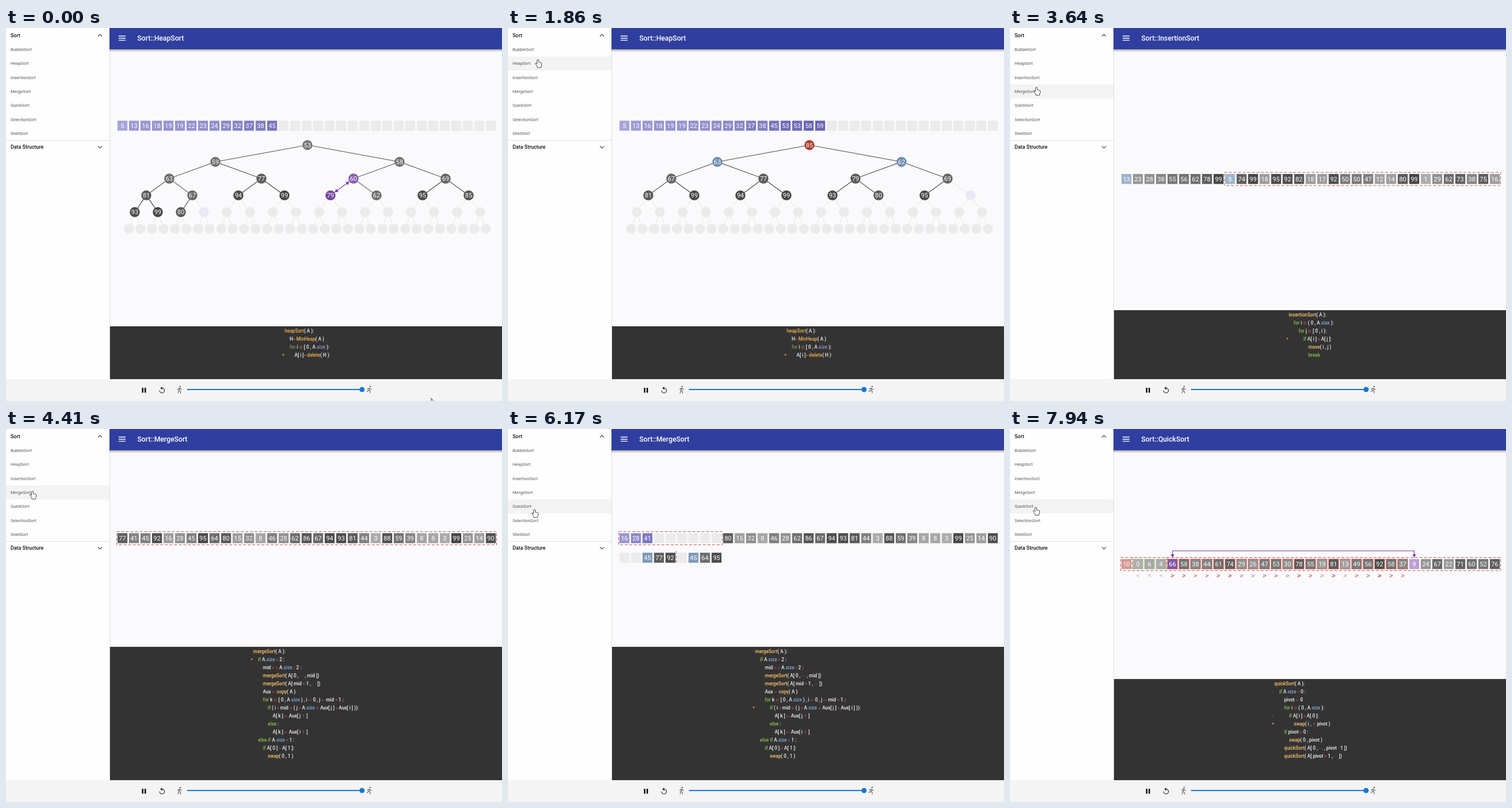
Write an HTML page that moves like this. It is 863 by 649 pixels and loops after 8 s.

```html
<!DOCTYPE html>
<html lang="en">
<head>
<meta charset="utf-8">
<title>Sorting visualizer</title>
<style>
  html, body { margin: 0; width: 100%; height: 100%; overflow: hidden; }
  svg { display: block; width: 863px; height: 649px; }
  text { font: 7.5px Roboto, "DejaVu Sans", sans-serif; fill: #555; white-space: pre; }
  .head { font-size: 8.9px; font-weight: 500; fill: #111; }
  .title { font-size: 12.2px; font-weight: 500; fill: #fff; }
  .num { font-size: 11px; fill: #fff; text-anchor: middle; }
  .rel { font-size: 9px; text-anchor: middle; }
  .code { font-size: 8.2px; font-weight: 500; fill: #f5f5f5; }
  .line { fill: none; stroke-width: 1.2; }
  .dash { fill: none; stroke: #c8564f; stroke-dasharray: 5 3; }
  .swap { fill: none; stroke: #7b3fa5; stroke-width: 1.2; marker-start: url(#tip); marker-end: url(#tip); }
</style>
</head>
<body>
<svg viewBox="0 0 863 649">
  <defs>
    <marker id="tip" markerUnits="userSpaceOnUse" markerWidth="7" markerHeight="7" refX="6" refY="3.5" orient="auto-start-reverse">
      <path d="M0 0L6 3.5L0 7z" fill="#7b3fa5"/>
    </marker>
    <linearGradient id="shade" x2="0" y2="1">
      <stop stop-color="#000" stop-opacity=".32"/><stop offset="1" stop-color="#000" stop-opacity="0"/>
    </linearGradient>
  </defs>
  <rect width="863" height="649" fill="#fafafc"/>
  <rect width="180" height="611" fill="#fefefe"/>
  <g id="view"></g>
  <path d="M180.5 0V611M0 195.5H180" stroke="#dfdfe2"/>
  <rect x="180" y="37" width="683" height="5" fill="url(#shade)"/>
  <rect x="180" width="683" height="37" fill="#303f9f"/>
  <path d="M196 14H208M196 17.7H208M196 21.4H208" stroke="#fff" stroke-width="1.4"/>
  <text class="title" id="title" x="228.5" y="22"></text>
  <text class="head" x="8" y="16">Sort</text>
  <text class="head" x="8" y="210">Data Structure</text>
  <path class="line" d="M160 14.5l3.5-3.5 3.5 3.5M160 205.3l3.5 3.5 3.5-3.5" stroke="#444"/>
  <rect y="611" width="863" height="38" fill="#f4f4f4"/>
  <path d="M236.5 626h2.6v8.5h-2.6zM241 626h2.6v8.5h-2.6z" fill="#111"/>
  <path class="line" d="M271.5 626.6a4.2 4.2 0 1 1-4.2 4.2" stroke="#222"/>
  <path d="M271.7 623.8v5.8l-3.2-2.9z" fill="#222"/>
  <g class="line" stroke="#666">
    <path d="M302.4 626l-1.2 4.3-2 5.2M301.4 630.5l2 1.8.4 3.4M302 626.4l-2.6 1.4-.3 2M302.8 626.6l1.4 2 2 .6"/>
    <path d="M632.5 626.3l-1 4-3.8 2.6M631.6 630.2l2 1.8v3.6M632.3 626.5l-3 1v1.8M633 627l1.2 1.6 2 .2"/>
  </g>
  <circle cx="303" cy="623.8" r="1.3" fill="#666"/>
  <circle cx="633.6" cy="623.8" r="1.3" fill="#666"/>
  <path d="M315 629H620" stroke="#1976d2" stroke-width="2"/>
  <circle cx="619.5" cy="629" r="4.5" fill="#1976d2"/>
  <g id="cursor"></g>
</svg>
<script>
const LOOP = 8000, TICK = 110.28, N = 33, PITCH = 20.03;
const $ = id => document.getElementById(id);
const mix = (a, b, p) => a + (b - a) * p;
const nums = s => s.split(' ').map(Number);

// colour ramps from value 0 to value 99
const ramps = {
  gray: [[174, 174, 174], [70, 70, 70]],
  done: [[172, 170, 220], [58, 49, 150]],
  swap: [[195, 172, 220], [95, 45, 140]],
  blue: [[168, 188, 210], [75, 112, 150]],
  red: [[215, 165, 160], [162, 40, 28]]
};
const tone = (name, v) =>
  `rgb(${ramps[name][0].map((c, i) => Math.round(mix(c, ramps[name][1][i], v / 99)))})`;

function heapSteps() {
  const steps = [], out = nums('5 13 16 18 19 19 22 23 24 29 32 37 38 45');
  const h = [0, ...nums('53 59 58 63 77 60 69 81 67 94 99 79 62 95 85 93 99 80')];
  let taken = 53, hole = 19;
  const snap = s => steps.push({ h: [...h], out: [...out], hole, line: 3, key: steps.length == 19, ...s });
  snap({ swap: [6, 12] });
  while (h.length > 3) {
    out.push(taken);
    taken = h[1];
    h[1] = h.pop();
    hole = h.length;
    for (let i = 1; ;) {
      const kids = [2 * i, 2 * i + 1].filter(k => k < h.length);
      if (!kids.length) break;
      snap({ hot: i, cmp: kids });
      const k = kids.reduce((a, b) => h[b] < h[a] ? b : a);
      if (h[k] >= h[i]) break;
      [h[i], h[k]] = [h[k], h[i]];
      snap({ swap: [i, k] });
      i = k;
    }
  }
  return steps;
}

function insertionSteps() {
  const steps = [], a = nums('55 23 78 13 99 62 38 28 56 8 74 99 18 95 92 82 18 17 92 50 50 47 12 14 80 99 1 29 62 73 38 75 16');
  const snap = s => steps.push({ a: [...a], ...s });
  for (let i = 1; i < N; i++) {
    for (let j = 0; j < i; j++) {
      snap({ box: [i, N], cmp: [j, i], line: 3, key: i == 9 && !j });
      if (a[i] < a[j]) {
        snap({ box: [i, N], swap: [j, i], line: 4, dur: 4 });
        a.splice(j, 0, a.splice(i, 1)[0]);
        break;
      }
    }
  }
  return steps;
}

function mergeSteps() {
  const steps = [], a = nums('77 41 45 92 16 28 45 95 64 80 15 32 8 46 28 62 86 67 94 93 81 44 3 88 59 39 8 8 3 99 25 14 90');
  const snap = s => steps.push({ a: [...a], ...s });
  const sort = (l, r) => {
    const box = [l, r];
    snap({ box, line: 1 });
    if (r - l > 2) {
      const mid = l + Math.ceil((r - l) / 2);
      sort(l, mid);
      sort(mid, r);
      const aux = [...a];
      a.fill(null, l, r);
      for (let k = l, i = l, j = mid; k < r; k++) {
        const state = line => ({ box, line, split: mid, done: k, aux: [...aux] });
        const auxCmp = [i < mid ? i : -1, j < r ? j : -1];
        snap({ ...state(7), auxCmp, key: r == 9 && !l && k == 3 });
        const right = j < r && (i >= mid || aux[j] < aux[i]), from = right ? j++ : i++;
        a[k] = aux[from];
        aux[from] = null;
        snap({ ...state(right ? 8 : 10), done: k + 1 });
      }
    } else if (r - l > 1) {
      snap({ box, line: 12, cmp: [l, l + 1] });
      if (a[l] > a[l + 1]) {
        snap({ box, line: 13, swap: [l, l + 1] });
        [a[l], a[l + 1]] = [a[l + 1], a[l]];
      }
    }
  };
  sort(0, N);
  return steps;
}

function quickSteps() {
  const steps = [], a = nums('10 0 6 4 66 58 38 44 61 74 29 26 47 53 30 78 55 19 81 13 49 56 92 58 37 9 24 67 22 71 60 52 76');
  let lo = 1;
  for (let i = 1; i < N; i++) {
    const snap = s => steps.push({ a: [...a], box: [0, N], hot: 0, lo, hi: i, marks: [[1, '#b03a3a'], [4, '#3f8f55']], ...s });
    snap({ line: 4, cmp: [i] });
    if (a[i] < a[0]) {
      snap({ line: 5, swap: lo < i && [lo, i], key: i == 25, dur: 3 });
      [a[lo], a[i]] = [a[i], a[lo]];
      lo++;
    }
  }
  return steps;
}

const bright = { kw: '#8bc34a', fn: '#ffc66d', prop: '#86a9dc', op: '#dc564f' };
const scenes = [
  { name: 'HeapSort', at: 0, start: 0, hit: 17, x: 485, y: 170, steps: heapSteps(),
    ink: { kw: '#8f8f66', fn: '#f0b352', prop: '#9c8fd0', op: '#e07b39' },
    code: ['heapSort( A ):', ' H←MinHeap( A )', ' for i ∈ [ 0 , A.size ):', '  A[ i ]←delete( H )'] },
  { name: 'InsertionSort', at: 25, start: 27, hit: 33, x: 485, y: 262.7, steps: insertionSteps(), ink: bright,
    code: ['insertionSort( A ):', ' for i ∈ ( 0 , A.size ):', '  for j ∈ [ 0 , i ):', '   if A[ i ] < A[ j ]:', '    move( i , j )', '    break'] },
  { name: 'MergeSort', at: 37, start: 39.9, hit: 56, x: 430, y: 190, steps: mergeSteps(), ink: bright,
    code: ['mergeSort( A ):', ' if A.size > 2 :', '  mid ← ⌈ A.size / 2 ⌉', '  mergeSort( A[ 0 , ⋯ , mid ])', '  mergeSort( A[ mid + 1 , ⋯ ])', '  Aux ← copy( A )',
      '  for k ∈ [ 0 , A.size ) , i ← 0 , j ← mid + 1 :', '   if ( i > mid ∨ ( j < A.size ∧ Aux[ j ] < Aux[ i ] )):', '    A[ k ] ← Aux[ j ↑ ]', '   else :',
      '    A[ k ] ← Aux[ i ↑ ]', ' else if A.size > 1 :', '  if A[ 0 ] > A[ 1 ]:', '   swap( 0 , 1 )'] },
  { name: 'QuickSort', at: 66, start: 68, hit: 72, x: 460, y: 235, steps: quickSteps(), ink: bright,
    code: ['quickSort( A ):', ' if A.size > 0 :', '  pivot ← 0', '  for i ∈ ( 0 , A.size ):', '   if A[ i ] < A[ 0 ]:', '    swap( i , ↑ pivot )',
      '  if pivot ≠ 0 :', '   swap( 0 , pivot )', '  quickSort( A[ 0 , ⋯ , pivot - 1 ])', '  quickSort( A[ pivot + 1 , ⋯ ])'] }
];
for (const s of scenes) {
  let sum = 0;
  for (const step of s.steps) { step.from = sum; sum += step.dur || 1; }
  s.rate = (s.steps.find(step => step.key).from + .3) / (s.hit - s.start);
  s.top = 575 - 14 * s.code.length;
}
const stepAt = (s, tick) => {
  const u = Math.max(0, (tick - s.start) * s.rate);
  return s.steps.findLast(step => step.from <= u);
};

// ---- drawing ----
const cellX = i => 194 + PITCH * i;
const num = (x, y, v) => `<text class="num" x="${x}" y="${y + 4}">${v}</text>`;
function cell(i, y, v, ramp, edge) {
  const fill = v == null ? '#ebebeb' : tone(ramp, v);
  return `<rect x="${cellX(i)}" y="${y - 8.7}" width="17.2" height="17.4" fill="${fill}" ${edge ? `stroke="${edge}"` : ''}/>` +
    (v == null ? '' : num(cellX(i) + 8.6, y, v));
}

function drawHeap(s, y) {
  let edges = '', nodes = '';
  const pos = k => {
    const level = 31 - Math.clz32(k), n = 2 ** level;
    return [204 + 641 * (k - n + .5) / n, 203.7 + 29.15 * level];
  };
  for (let k = 1; k < 64; k++) {
    const v = s.h[k], [cx, cy] = pos(k);
    const ramp = s.swap?.includes(k) ? 'swap' : s.cmp?.includes(k) ? 'blue' : s.hot == k ? 'red' : 'gray';
    if (k > 1) {
      const [px, py] = pos(k >> 1), len = Math.hypot(px - cx, py - cy);
      const dx = (px - cx) / len * 9, dy = (py - cy) / len * 9;
      edges += s.swap && s.swap[1] == k
        ? `<path class="swap" d="M${cx + dx} ${cy + dy}L${px - dx} ${py - dy}"/>`
        : `<path class="line" d="M${cx} ${cy}L${px} ${py}" stroke="${v ? tone('gray', v) : '#ebebeb'}"/>`;
    }
    const fill = v ? tone(ramp, v) : k == s.hole ? '#e9e8f4' : '#ebebeb';
    nodes += `<circle cx="${cx}" cy="${cy}" r="8.7" fill="${fill}"/>` + (v ? num(cx, cy, v) : '');
  }
  let row = '';
  for (let i = 0; i < N; i++) row += cell(i, y, s.out[i], 'done');
  return edges + nodes + row;
}

function drawArray(s, y) {
  let out = '';
  const [l, r] = s.box;
  s.a.forEach((v, i) => {
    const ramp = s.swap && s.swap.includes(i) ? 'swap' : s.cmp?.includes(i) ? 'blue' : s.hot === i ? 'red'
      : s.done && i >= l && i < s.done ? 'done' : 'gray';
    const seen = i > 0 && i < s.hi, small = i < s.lo;
    out += cell(i, y, v, ramp, seen && (small ? '#a9c48f' : '#d4605a'));
    if (seen) out += `<text class="rel" x="${cellX(i) + 8.6}" y="${y + 23}" style="fill:${tone('red', v)}">${small ? '≺' : '≽'}</text>`;
    if (s.aux && i >= l && i < r) out += cell(i, y + 34, s.aux[i], s.auxCmp?.includes(i) ? 'blue' : 'gray');
  });
  const bar = (i, cy) => `<path class="dash" d="M${cellX(i) - 1.3} ${cy - 12}v23.5"/>`;
  out += `<rect class="dash" x="${cellX(l) - 1.4}" y="${y - 11.5}" width="${PITCH * (r - l)}" height="23"/>`;
  if (s.split) out += bar(s.split, y + 34);
  if (s.lo) out += bar(1, y) + bar(s.lo, y);
  if (s.swap) {
    const [x1, x2] = s.swap.map(i => cellX(i) + 8.6);
    out += `<path class="swap" d="M${x1} ${y - 11.5}V${y - 23}H${x2}V${y - 11.5}"/>`;
  }
  return out;
}

const tokens = /\b(for|if|else|break)\b|(\w+)(?=\()|(\.size)|([←∈<>∨∧↑⋯≠+\-\/⌈⌉])/g;
function drawCode(scene, step, top) {
  const { ink, x, code } = scene;
  const span = (color, s, size = '') => `<tspan fill="${color}" ${size}>${s}</tspan>`;
  const paint = s => s.replace(tokens, (m, kw, fn, prop) =>
    kw ? span(ink.kw, m) : fn ? span(ink.fn, m) : prop ? span(ink.prop, m)
      : span(ink.op, m == '<' ? '&lt;' : m, 'font-size="7"'));
  const pointer = (line, color, size) =>
    `<path d="M${x - 3.5} ${top + 7.5 + 14 * line - size}l${size * 1.8} ${size}l${-size * 1.8} ${size}z" fill="${color}"/>`;
  return `<rect x="180" y="${top}" width="683" height="${611 - top}" fill="#333"/>` +
    code.map((s, i) => {
      const depth = s.search(/\S/);
      return `<text class="code" x="${x + 8.5 * depth}" y="${top + 10.6 + 14 * i}">${paint(s.trim())}</text>`;
    }).join('') +
    (step.marks || []).map(([line, color]) => pointer(line, color, 1.2)).join('') +
    pointer(step.line, '#f0a030', 1.8);
}

const items = ['Bubble', 'Heap', 'Insertion', 'Merge', 'Quick', 'Selection', 'Shell'];
function drawMenu([x, y]) {
  const row = x < 180 ? Math.floor((y - 25.3) / 24.3) : -1;
  return (row >= 0 && row < 7 ? `<rect y="${25.3 + 24.3 * row}" width="180" height="24.3" fill="#f3f3f3"/>` : '') +
    items.map((s, i) => `<text x="8" y="${40.2 + 24.28 * i}">${s}Sort</text>`).join('');
}

// pointer route: tick, x, y
const route = [[0, 740, 644], [8, 70, 175], [12, 56, 120], [16, 52, 72], [17, 52, 55], [20, 52, 56], [24, 48, 86],
  [26, 47, 88], [33, 46, 103], [40, 46, 108], [48, 46, 128], [56, 46, 140], [62, 44, 137], [73, 45, 136]];
function pointerAt(tick) {
  const i = route.findIndex(p => p[0] > tick), [a, b] = [route[i - 1], route[i]];
  const p = (tick - a[0]) / (b[0] - a[0]);
  return [mix(a[1], b[1], p), mix(a[2], b[2], p)];
}
const hand = 'M-1.5 .8v6.5l-1.8-1.4q-1.6-.2-1 1.2l3.3 5.2v1.7h6.5v-1.7q1.3-2 1.2-5.4q-.2-1.5-1.6-1q-.4-1.2-1.8-.6q-.5-1-1.8-.3v-4.2q-1.5-1.6-3 0z';
const arrow = 'M0 0v8.5l2-1.8h3z';

const outBack = u => 1 + 2.7 * (u - 1) ** 3 + 1.7 * (u - 1) ** 2;
function render(tick) {
  const n = scenes.findLastIndex(s => s.at <= tick), scene = scenes[n], prev = scenes[n - 1];
  const age = tick - scene.at, step = stepAt(scene, tick), mouse = pointerAt(tick);
  const top = prev ? mix(prev.top, scene.top, outBack(Math.min((age + 1) / 3, 1))) : scene.top;
  const shown = prev && age < 1 ? prev : scene;
  const alpha = prev ? [.4, 0, .6][age] ?? 1 : 1;
  const draw = shown == scenes[0] ? drawHeap : drawArray;
  $('title').textContent = 'Sort::' + scene.name;
  $('view').innerHTML = drawMenu(mouse) +
    `<g opacity="${alpha}">${draw(stepAt(shown, tick), shown.y)}</g>` + drawCode(scene, step, top);
  $('cursor').innerHTML =
    `<path transform="translate(${mouse})" d="${mouse[0] < 180 ? hand : arrow}" fill="#fff" stroke="#333" stroke-width=".9"/>`;
}

let last = -1;
function loop() {
  const tick = Math.floor((performance.now() % LOOP + 15) / TICK);
  if (tick != last) render(last = tick);
  requestAnimationFrame(loop);
}
loop();
</script>
</body>
</html>
```
